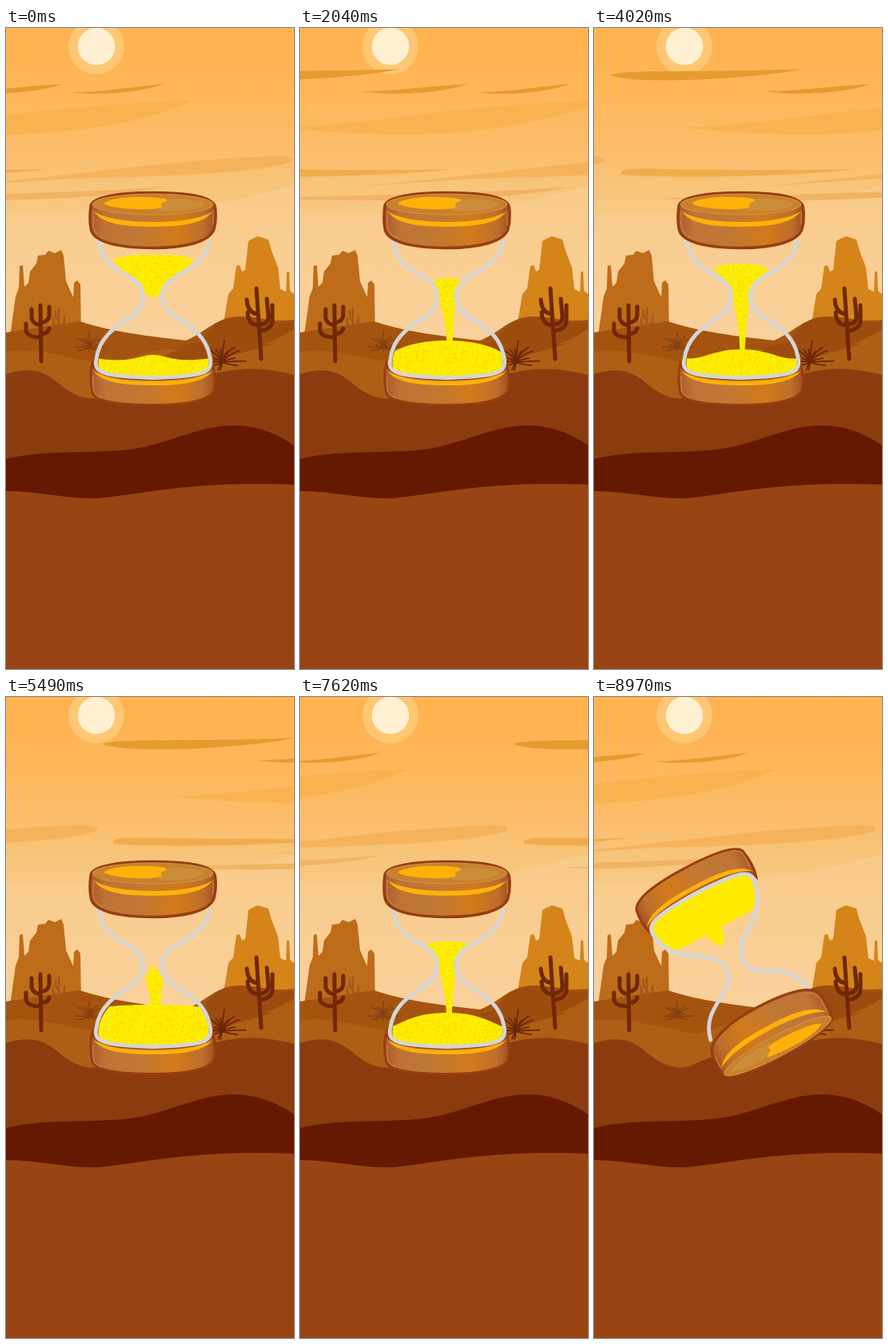
An HTML page for the animation above (9 s loop, 360 px wide and 800 px high).

```html
<!DOCTYPE html>
<html lang="en">
<head>
<meta charset="utf-8">
<title>Desert hourglass</title>
<style>
  html, body { margin: 0; width: 100%; height: 100%; overflow: hidden; background: #984513; }
  svg { display: block; width: 100vw; height: 100vh; }
</style>
</head>
<body>
<svg viewBox="0 0 360 800" preserveAspectRatio="none">
  <defs>
    <linearGradient id="sky" x1="0" y1="0" x2="0" y2="400" gradientUnits="userSpaceOnUse">
      <stop offset="0" stop-color="#ffb24e"/>
      <stop offset=".2" stop-color="#feb659"/>
      <stop offset=".36" stop-color="#fcbc69"/>
      <stop offset=".5" stop-color="#f7c57a"/>
      <stop offset=".62" stop-color="#f8cb8a"/>
      <stop offset="1" stop-color="#f9d19c"/>
    </linearGradient>
    <linearGradient id="haze" x1="0" y1="195" x2="0" y2="390" gradientUnits="userSpaceOnUse">
      <stop offset="0" stop-color="#f9cb89"/>
      <stop offset="1" stop-color="#f9d19c"/>
    </linearGradient>
    <linearGradient id="wood">
      <stop offset="0" stop-color="#a95a26"/>
      <stop offset=".12" stop-color="#bd7436"/>
      <stop offset=".4" stop-color="#c07834"/>
      <stop offset=".7" stop-color="#d17a1a"/>
      <stop offset=".9" stop-color="#bd6f2b"/>
      <stop offset="1" stop-color="#a2501f"/>
    </linearGradient>
    <pattern id="grain" width="48" height="48" patternUnits="userSpaceOnUse">
      <rect width="48" height="48" fill="#fdeb00"/>
    </pattern>
    <clipPath id="bulb">
      <path d="M170 350C148 370 124 384 117 408C113 425 116 431 140 434Q184 438 232 434C254 431 255 424 252 406C244 380 218 364 196 350Z"/>
    </clipPath>
  </defs>

  <rect width="360" height="800" fill="url(#sky)"/>
  <circle cx="113" cy="23" r="35" fill="#ffc673"/>
  <circle cx="113" cy="23" r="23.3" fill="#fff0d2"/>
  <path d="M0 233C90 235 190 229 250 221Q310 212 360 196V400H0Z" fill="url(#haze)"/>

  <g id="clouds">
    <g id="cloudSet">
      <path transform="translate(-255)" fill="#e69b31" d="M0 59C8 51 120 56 240 51C200 61 40 73 0 59Z"/>
      <path transform="translate(-63)" fill="#e69b31" d="M0 79C40 79 90 72 133 70C110 79 50 86 0 79Z"/>
      <path transform="translate(80 9) scale(.88)" fill="#e69b31" d="M0 81C40 81 90 73 133 69C110 79 50 87 0 81Z"/>
      <path transform="translate(-170)" fill="#f8b04b" d="M0 124C60 122 110 117 170 109C260 98 340 92 403 90C350 118 250 132 170 133C100 133 40 128 0 124Z" opacity=".75"/>
      <path transform="translate(-70)" fill="#f5b055" d="M0 198C150 185 280 164 400 160C428 159 434 163 424 168C380 182 250 186 150 188Z" opacity=".8"/>
      <path transform="translate(-242)" fill="#f2ab4c" d="M0 181C0 175 20 175 60 176C150 177 230 178 292 176C240 184 60 189 0 183Z"/>
      <path transform="translate(-195)" fill="#f1b363" d="M0 213C130 208 300 206 393 198C340 212 200 219 0 213Z"/>
    </g>
    <use href="#cloudSet" x="-620"/>
  </g>

  <path fill="#bd6c1a" d="M5 385L12 335L16 325L17 297L21 296L23 323L28 318L30 304L38 294L40 284L49 283L53 278L61 281L69 277L72 284L75 316L84 336L85 318L89 315L93 320L94 385Z"/>
  <path fill="#d5841a" d="M269 385L278 332L284 325L288 297L292 296L295 304L299 302L303 266L308 263L315 260L328 264L332 278L340 299L343 326L350 329L351 304L354 304L355 328L360 332V390H269Z"/>

  <path fill="#a4540f" d="M0 380Q40 374 92 366C130 379 180 385 225 390C250 380 262 361 290 360C320 360 330 368 360 364V480H0Z"/>
  <path fill="#9d4c10" d="M130 480C150 420 200 400 245 391C262 361 280 360 300 361C325 362 335 370 360 367V480Z"/>
  <path fill="#ad6015" d="M0 404C30 397 80 412 130 421C180 400 225 394 245 410C290 408 325 398 360 376V480H0Z"/>
  <path fill="#9d4c10" d="M130 480C150 430 190 408 245 391L262 395C300 398 322 396 337 393C310 402 285 406 262 418C220 440 180 440 160 480Z"/>
  <g fill="none" stroke-linecap="round" stroke-linejoin="round">
    <path stroke="#a0581a" stroke-width="2.4" d="M66 350V383M59 362V368Q60 372 66 372M73 361V367Q72 371 66 371M62 353V360Q63 364 66 364"/>
    <path id="bushBack" stroke="#834010" stroke-width="1.4"/>
    <path id="bushFront" stroke="#6c2506" stroke-width="1.8"/>
  </g>

  <path fill="#8b3c0f" d="M0 432C25 424 44 425 64 442C85 460 105 469 128 457C160 439 210 449 255 433C295 422 325 424 360 433V560H0Z"/>
  <g fill="none" stroke="#702806" stroke-width="5" stroke-linecap="round" stroke-linejoin="round">
    <path d="M43 346L44 416M25 369V378Q27 386 43 386M32 351V362Q34 370 43 371M54 348V359Q53 367 43 368M54 375Q53 381 44 382"/>
    <path d="M313 325L319 413M302 355Q303 371 316 371M301 339Q302 355 314 357M326 338L328 360Q328 369 318 370M333 346V366Q332 376 318 378"/>
  </g>

  <path fill="#651900" d="M0 538C45 526 100 532 155 526C205 519 239 496 285 496C315 496 340 507 360 521V600H0Z"/>
  <path fill="#984513" d="M0 578C35 577 75 588 115 587C170 582 230 565 360 570V800H0Z"/>

  <g id="glass">
    <path id="lower" clip-path="url(#bulb)"/>
    <path id="upper"/>
    <path fill="url(#wood)" stroke="#983d10" stroke-width="3" d="M108 419C104 431 106 446 108 456C114 467 148 470.5 184 470.5C221 470.5 255 466 260 452C262 440 261 428 258 419C256 434 228 438 184 438C140 438 112 434 108 419Z"/>
    <path fill="#ffb10a" d="M109 428C128 439 158 441 184 441S242 438 258 428C248 442 220 446 184 446S121 443 109 428Z"/>
    <path fill="none" stroke="#d5d5d5" stroke-width="4.8" stroke-linecap="round" d="M116 266C121 297 141 302 160 314C177 327 174 346 158 359C135 374 116 387 113 413C109 430 120 435 184 436.500C249 435 259 430 255 411C250 382 229 372 208 358C192 346 191 329 204 316C224 301 248 296 254 266"/>
    <path fill="url(#wood)" stroke="#983d10" stroke-width="3.4" d="M106 222C108 211 140 205.500 184 205.500C228 205.500 260 211 261.500 224C263 236 262 244 260 251C255 267 223 274.500 184 274.500C140 274.500 108 267 106 250C104 240 105 230 106 222Z"/>
    <ellipse cx="183.500" cy="220" rx="75.500" ry="13" fill="#c9812c" stroke="#d59a55" stroke-width=".8"/>
    <path fill="#cb8d38" d="M193 216C209 210 235 214 248 218C251 226 218 230 191 228Z"/>
    <path fill="#ffb10a" d="M122 219C132 210 172 209 199 213C207 217 189 217 195 223C195 228 137 228 122 219Z"/>
    <path fill="#ffb10a" d="M110 229C126 239 157 242 184 242S242 239 258 229C248 244 220 248 184 248S121 245 110 229Z"/>
    <path fill="none" stroke="#d99d68" stroke-width="1" opacity=".7" d="M109 228V248Q111 258 122 262M109 434V452Q111 459 120 462M259 228V246"/>
  </g>
</svg>

<script>
const LOOP = 9000, TURN = 3000, FLIP_START = 2819, DRIFT = 0.0685;
const el = id => document.getElementById(id);
const clamp = (v, lo = 0, hi = 1) => Math.min(hi, Math.max(lo, v));

// Piecewise linear value through [position, value] pairs.
function track(keys, p) {
  if (p <= keys[0][0]) return keys[0][1];
  for (let i = 1; i < keys.length; i++) {
    const [a, va] = keys[i - 1], [b, vb] = keys[i];
    if (p <= b) return va + (vb - va) * (p - a) / (b - a);
  }
  return keys[keys.length - 1][1];
}

const LEVEL = [[0, 283], [360, 283], [1020, 294.5], [1620, 305], [2040, 312.5], [2490, 335], [2820, 362]];
const CREST = [[0, 408], [360, 408], [1020, 401], [1620, 394], [2040, 390], [2490, 384]];
const RIM = [[0, 416], [360, 416], [1020, 414], [1620, 412], [2040, 408], [2490, 389], [2820, 386]];
const FUNNEL = [[285, 43], [300, 34], [310, 27], [317, 20], [325, 15], [335, 11], [352, 7.8], [370, 5.5], [390, 3.7], [410, 2.7]];

function upperSand(p) {
  const top = track(LEVEL, p);
  const tip = p < 300 ? 336 + p * 0.245 : track(CREST, p) + 3;
  const late = clamp((top - 313) / 22);
  const fall = Math.max(0, top - 335);
  const spread = 0.24 * clamp(1 - p / 360);
  const left = [], right = [];
  for (let i = 0; i <= 60; i++) {
    const y = top + (tip - top) * (i / 60) ** 1.4;
    const corner = clamp((y - top) / (6 + 11 * late)) ** (0.35 + 0.65 * late);
    const wide = 1 + spread * clamp((318 - y) / 18) + 0.4 * late;
    const half = Math.min(track(FUNNEL, y - fall) * wide * corner, (tip - y) * 2 + 1);
    const mid = 184 + 3 * clamp((y - 335) / 40) * clamp(p / 2000);
    left.push(`${(mid - half).toFixed(2)} ${y.toFixed(2)}`);
    right.unshift(`${(mid + half).toFixed(2)} ${y.toFixed(2)}`);
  }
  return `M${left.concat(right).join("L")}Z`;
}

function lowerSand(p) {
  const rim = track(RIM, p), crest = track(CREST, p), k = clamp(p / 2000);
  const outer = 48 * (1 - k), inner = 18 + 36 * k;
  const edge = rim - 4 * (1 - k), dip = rim + 3 * (1 - k);
  return `M108 440V${edge}H112C${112 + outer} ${dip} ${184 - inner} ${crest} 184 ${crest}` +
    `C${184 + inner} ${crest} ${256 - outer} ${dip} 256 ${edge}H260V440Z`;
}

function addGrain() {
  let seed = 7, dots = "";
  const rnd = () => (seed = seed * 16807 % 2147483647) / 2147483647;
  for (let i = 0; i < 260; i++) {
    const color = rnd() < 0.5 ? "#f3d800" : "#fff522";
    dots += `<circle cx="${(rnd() * 48).toFixed(1)}" cy="${(rnd() * 48).toFixed(1)}" r=".8" fill="${color}"/>`;
  }
  el("grain").innerHTML += dots;
}

function bush(cx, cy, size, lean) {
  let d = "";
  for (let i = 0; i < 13; i++) {
    const a = Math.PI * (1.08 - i * 1.16 / 12);
    const r = size * (0.75 + 0.25 * Math.sin(i * 2.4));
    const x = cx + Math.cos(a) * r + lean, y = cy - Math.sin(a) * r;
    d += `M${cx} ${cy}Q${cx + (x - cx) * 0.4} ${cy + (y - cy) * 0.75} ${x} ${y}`;
  }
  return d;
}

function draw(t) {
  const p = t % TURN, turning = p > FLIP_START;
  el("clouds").setAttribute("transform", `translate(${t * DRIFT})`);
  el("glass").setAttribute("transform", `rotate(${turning ? p - FLIP_START : 0} 179.700 333.500)`);
  const fill = turning ? "#ffeb00" : "url(#grain)";
  for (const [id, shape] of [["upper", upperSand], ["lower", lowerSand]]) {
    el(id).setAttribute("d", shape(p));
    el(id).setAttribute("fill", fill);
  }
}

addGrain();
el("bushBack").setAttribute("d", bush(104, 399, 20, 0) + "M104 396V403");
el("bushFront").setAttribute("d", bush(270, 417, 27, 3) + "M270 415L265 427M271 415L268 427");

const start = performance.now();
function frame() {
  draw((performance.now() - start) % LOOP);
  requestAnimationFrame(frame);
}
draw(0);
requestAnimationFrame(frame);
</script>
</body>
</html>
```
